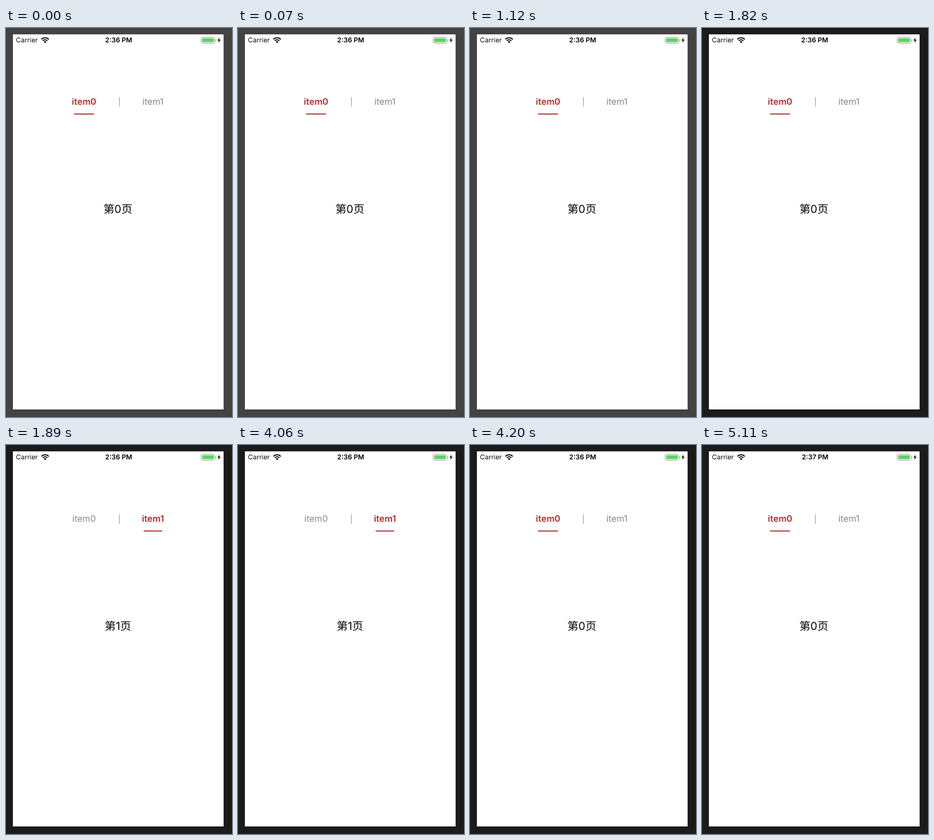
These frames come from a looping animation (330 px wide and 568 px high, 5.67 s). An HTML page:

```html
<!DOCTYPE html>
<html lang="zh">
<head>
<meta charset="utf-8">
<title>Tab pages</title>
<style>
  html, body { margin: 0; width: 100%; height: 100%; overflow: hidden; background: #fff; }
  svg { display: block; width: 330px; height: 568px; }
  text { font-family: Inter, "Noto Sans CJK SC", "Noto Sans CJK", sans-serif; text-rendering: geometricPrecision; }
  .status { font-size: 9.8px; }
  .tab { font-size: 13px; text-anchor: middle; }
  .mid { text-anchor: middle; }
</style>
</head>
<body>
<svg viewBox="0 0 330 568" xmlns="http://www.w3.org/2000/svg">
  <rect id="bezel" width="330" height="568"/>
  <rect id="rim" x="9.5" y="9" width="308.5" height="548.5" fill="#fff" stroke-width="1"/>
  <rect x="10" y="9.5" width="307.5" height="547.5" fill="#fff"/>

  <text class="status" x="14.5" y="21.3" fill="#111">Carrier</text>
  <g fill="none" stroke="#000" stroke-width="1.5">
    <path d="M51.7 16.6a7.6 7.6 0 0 1 10.8 0"/>
    <path d="M53.7 18.7a4.8 4.8 0 0 1 6.8 0"/>
  </g>
  <path d="M57.1 22.2l-1.9-1.9a2.7 2.7 0 0 1 3.8 0z"/>
  <text id="clock" class="status mid" y="21.4" font-weight="600"></text>

  <rect x="284.9" y="13.5" width="20" height="8.8" rx="2.2" fill="none" stroke="#a2a2a2" stroke-width=".9"/>
  <rect x="286.4" y="15" width="17" height="5.8" rx="1" fill="#62d166"/>
  <path d="M305.9 16.5q1.2.3 1.2 1.4t-1.2 1.4z" fill="#a2a2a2"/>
  <path d="M311.9 14l-3.2 4.3h2.1l-.7 3.4 3.2-4.4h-2.1z"/>

  <text id="tab0" class="tab" x="114" y="112.4">item0</text>
  <text id="tab1" class="tab" x="214.6" y="112.4">item1</text>
  <rect x="165" y="101" width="1" height="14" fill="#a8a8a8"/>
  <rect id="line" y="124.8" height="1.6" fill="#ab302e"/>
  <text id="page" class="mid" x="163.4" y="269.6" font-size="16"></text>
</svg>
<script>
const LOOP = 5670, DIM = 1820, NEXT = 1890, BACK = 4200, MINUTE = 5110;
const $ = id => document.getElementById(id);

function set(id, attrs, label) {
  const el = $(id);
  for (const key in attrs) el.setAttribute(key, attrs[key]);
  if (label !== undefined && el.textContent !== label) el.textContent = label;
}

function draw(t) {
  const dark = t >= DIM;
  const page = t >= NEXT && t < BACK ? 1 : 0;
  const late = t >= MINUTE;

  set('bezel', { fill: dark ? '#1c1b1b' : '#444343' });
  set('rim', { stroke: dark ? '#111' : '#383737' });
  set('clock', { x: late ? 165.2 : 164.6 }, late ? '2:37 PM' : '2:36 PM');
  for (let i = 0; i < 2; i++) {
    const on = i === page;
    set('tab' + i, { fill: on ? '#b02b2b' : '#888', 'font-weight': on ? 600 : 400 });
  }
  set('line', page ? { x: 201, width: 27 } : { x: 99.4, width: 29 });
  set('page', {}, '第' + page + '页');
}

const start = performance.now();
function tick() {
  draw((performance.now() - start) % LOOP);
  requestAnimationFrame(tick);
}
draw(0);
requestAnimationFrame(tick);
</script>
</body>
</html>
```
